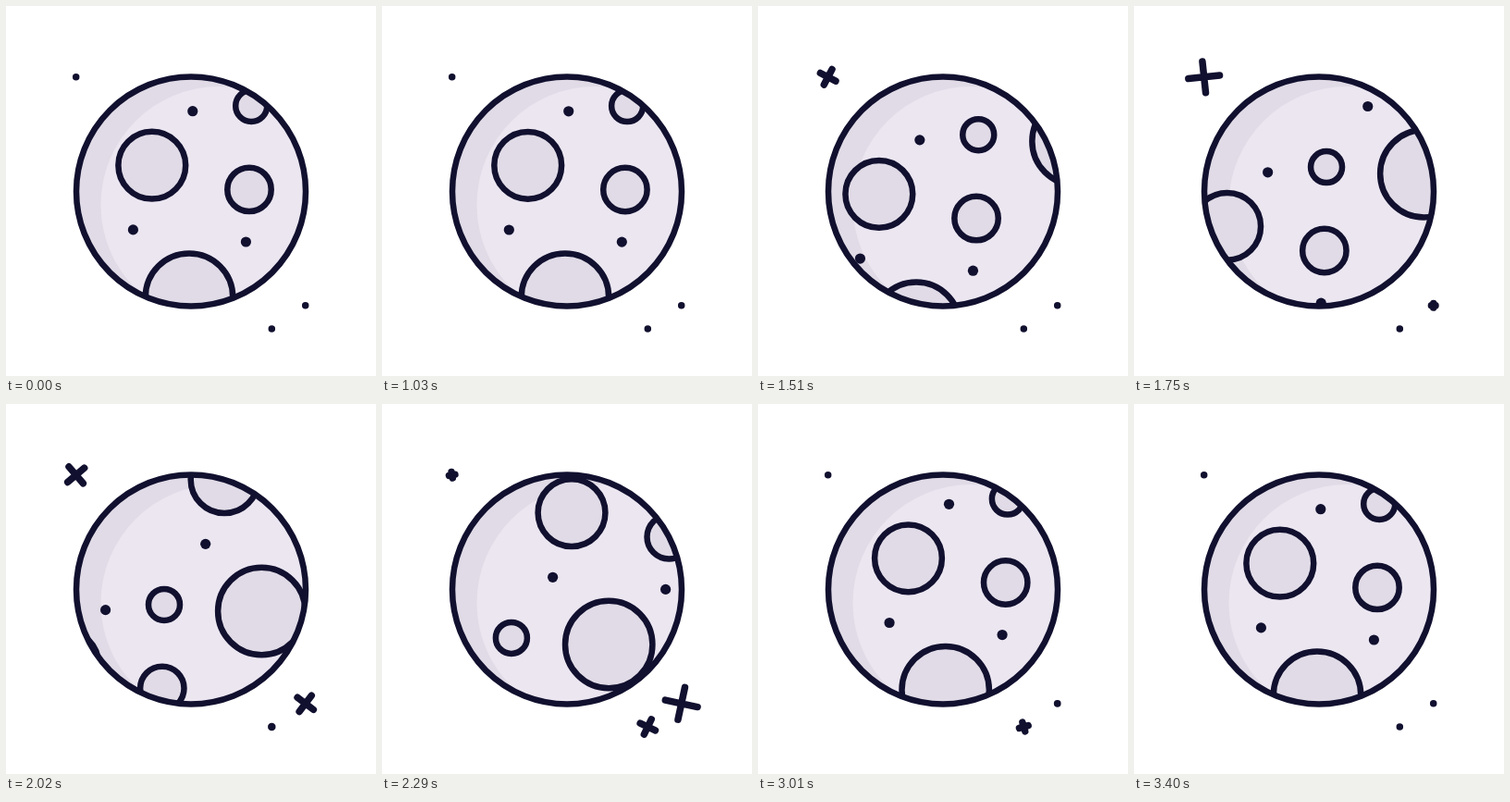
An HTML page that plays this animation: 400 px wide and 400 px high, repeating every 3430 ms.

```html
<!DOCTYPE html>
<html lang="en">
<head>
<meta charset="utf-8">
<title>Turning moon</title>
<style>
  html, body { margin: 0; width: 100%; height: 100%; overflow: hidden; background: #fff; }
  svg { display: block; width: 100%; height: 100%; }
  .line { stroke: #11102f; stroke-width: 6.5; }
  .base { fill: #ebe6f0; }
  .shade { fill: #e0dbe6; }
  .ink { fill: #11102f; }
  .star { fill: none; stroke: #11102f; stroke-width: 7.5; stroke-linecap: round; }
</style>
</head>
<body>
<svg viewBox="0 0 400 400">
  <defs>
    <clipPath id="disc"><circle cx="200" cy="200.4" r="124"/></clipPath>
    <g id="surface">
      <g class="shade line">
        <circle cx="157.8" cy="172.2" r="36.4"/>
        <circle cx="263" cy="198.4" r="23.7"/>
        <circle cx="265.2" cy="108" r="17"/>
        <circle cx="198" cy="314.6" r="47.2"/>
      </g>
      <g class="ink">
        <circle cx="201.8" cy="113.7" r="5.6"/>
        <circle cx="137.4" cy="241.9" r="5.6"/>
        <circle cx="259.4" cy="255" r="5.6"/>
      </g>
    </g>
  </defs>
  <g clip-path="url(#disc)">
    <circle class="shade" cx="200" cy="200.4" r="124"/>
    <circle class="base" cx="230.5" cy="215" r="128"/>
    <g id="drift">
      <use href="#surface"/>
      <use href="#surface" x="172.5" y="-199.5"/>
    </g>
  </g>
  <circle class="line" cx="200" cy="200.4" r="124" fill="none"/>
  <g id="stars"></g>
</svg>
<script>
  const LOOP = 3430, STEP = 30, HOLD = 1030;
  const TRAVEL = { x: -172.5, y: 199.5, start: 1000, time: 2400 };
  const STAR = { time: 1400, peak: 0.41, arm: 18.2 };
  const stars = [
    { x: 75.7, y: 76.8, start: 1215 },
    { x: 323.7, y: 323.8, start: 1678 },
    { x: 287.3, y: 349, start: 2005 }
  ];

  const clamp = v => Math.min(1, Math.max(0, v));

  // cubic-bezier(.333, 0, .4, 1)
  function ease(x) {
    if (x <= 0 || x >= 1) return clamp(x);
    let lo = 0, hi = 1, s;
    for (let i = 0; i < 24; i++) {
      s = (lo + hi) / 2;
      const q = 1 - s;
      if (q * q * s + 1.2 * q * s * s + s * s * s < x) lo = s; else hi = s;
    }
    return s * s * (3 - 2 * s);
  }

  const drift = document.getElementById('drift');
  const sky = document.getElementById('stars');
  for (const star of stars) {
    star.node = document.createElementNS('http://www.w3.org/2000/svg', 'path');
    star.node.setAttribute('class', 'star');
    sky.append(star.node);
  }

  function drawStar({ x, y, start, node }, t) {
    const u = clamp((t - start) / STAR.time);
    const p = ease(u);
    const size = u < STAR.peak ? u / STAR.peak : Math.sin(Math.PI * p);
    const a = Math.max(0.01, STAR.arm * size);
    node.setAttribute('d', `M${-a} 0H${a}M0 ${-a}V${a}`);
    node.setAttribute('transform', `translate(${x} ${y}) rotate(${180 * p})`);
  }

  function draw(ms) {
    let t = ms % LOOP;
    t = t < HOLD ? 0 : HOLD + Math.floor((t - HOLD) / STEP) * STEP;
    const p = ease((t - TRAVEL.start) / TRAVEL.time);
    drift.setAttribute('transform', `translate(${TRAVEL.x * p} ${TRAVEL.y * p})`);
    stars.forEach(star => drawStar(star, t));
  }

  const begin = performance.now();
  function tick() {
    draw(performance.now() - begin);
    requestAnimationFrame(tick);
  }
  tick();
</script>
</body>
</html>
```
